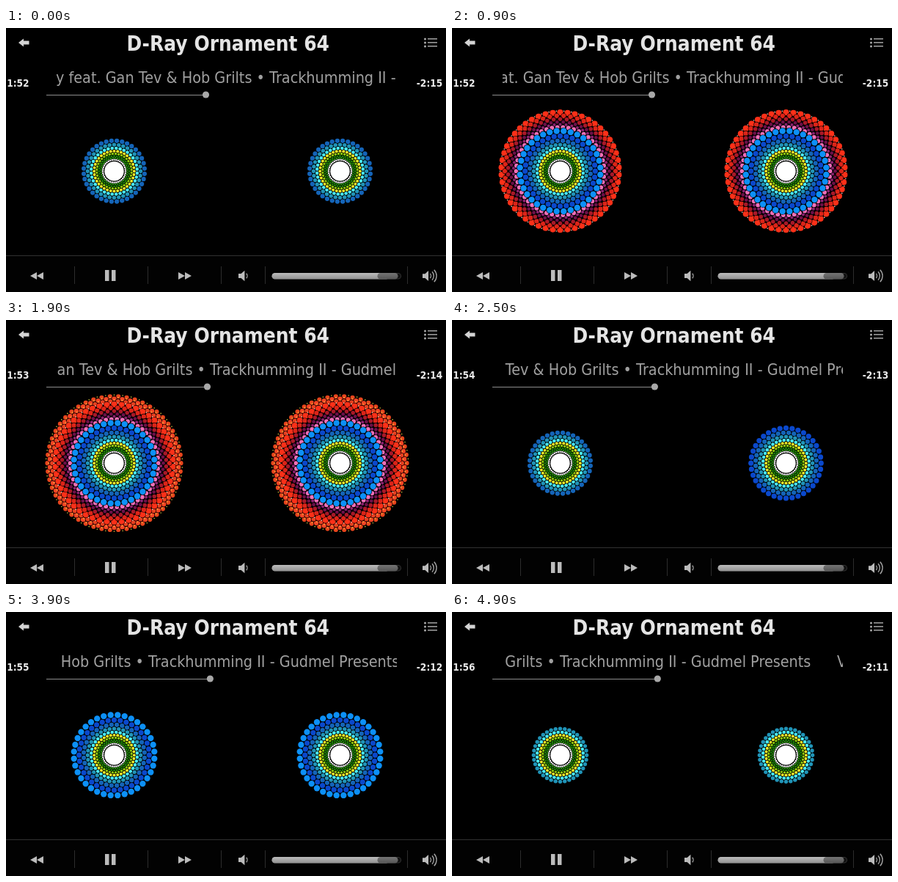
An HTML page with a canvas for the animation above (5 s loop, 600 by 360 pixels).

```html
<!DOCTYPE html>
<html>
<head>
<meta charset="utf-8">
<title>Music player</title>
<style>
html, body { margin: 0; height: 100%; overflow: hidden; background: #000; }
canvas { display: block; }
</style>
</head>
<body>
<canvas id="stage" width="600" height="360"></canvas>
<script>
const ctx = document.getElementById('stage').getContext('2d');
const TAU = Math.PI * 2;
const LOOP = 5000, STEP = 100;

// Inner rings grow by a fixed ratio, so their dots stay closely packed
const INNER = ['#fff', '#2c9c10', '#1c8408', '#8cc80c', '#ece82a',
  '#48e8f4', '#2094b8', '#1464b8', '#0a48cc', '#0c90f8'];
// Outer rings: [radius, dot radius, colour]
const OUTER = [
  [60, 2.9, '#f070b8'],
  [63.6, 2.1, '#8c2070'],
  [67, 2.4, '#6c1048'],
  [71, 2.8, '#a81828'],
  [75.3, 3.2, '#dc2418'],
  [80, 4.1, '#fc3018'],
  [84.4, 3, '#e84020'],
  [87.8, 3.2, '#f84424'],
  [91, 3.1, '#e8441c']
];
const RINGS = INNER.map((color, i) => {
  const r = 15.5 * 1.151 ** i;
  return [r, r * 0.076, color, 36];
}).concat(OUTER.map(ring => [...ring, 50]));

// Keyed values: [time, value, ...]
const SCROLL = [0, 359, 900, 320, 1900, 278, 2500, 251, 3300, 217, 3900, 194, 4900, 147];
const LEFT = [0, 45, 300, 70, 600, 52, 900, 85, 1200, 62, 1500, 77, 1900, 95, 2200, 70,
  2500, 45, 2900, 77, 3300, 45, 3500, 85, 3900, 59.5, 4200, 45, 4500, 85, 4900, 39];
const RIGHT = LEFT.map((v, i) => i % 2 && (LEFT[i - 1] === 2500 || LEFT[i - 1] === 3300) ? 52 : v);

function valueAt(keys, t) {
  let i = 0;
  while (i < keys.length - 4 && t > keys[i + 2]) i += 2;
  const [t0, a, t1, b] = keys.slice(i, i + 4);
  return a + (b - a) * (t - t0) / (t1 - t0);
}

function rect(x, y, w, h, color) {
  ctx.fillStyle = color;
  ctx.fillRect(x, y, w, h);
}

function poly(color, ...p) {
  ctx.beginPath();
  for (let i = 0; i < p.length; i += 2) ctx.lineTo(p[i], p[i + 1]);
  ctx.fillStyle = color;
  ctx.fill();
}

function dot(x, y, r, color) {
  ctx.beginPath();
  ctx.arc(x, y, r, 0, TAU);
  ctx.fillStyle = color;
  ctx.fill();
}

function pill(x, y, w, h, color) {
  ctx.beginPath();
  ctx.roundRect(x, y, w, h, h / 2);
  ctx.fillStyle = color;
  ctx.fill();
}

function shade(y0, y1, top, bottom) {
  const g = ctx.createLinearGradient(0, y0, 0, y1);
  g.addColorStop(0, top);
  g.addColorStop(1, bottom);
  return g;
}

// All text uses the condensed proportions of the face
function text(str, x, y, size, color, weight = 'normal', align = 'left') {
  ctx.save();
  ctx.translate(x, y);
  ctx.scale(0.9, 1);
  ctx.font = `${weight} ${size}px "DejaVu Sans", sans-serif`;
  ctx.textAlign = align;
  ctx.fillStyle = color;
  ctx.fillText(str, 0, 0);
  ctx.restore();
}

function clock(s) {
  return Math.floor(s / 60) + ':' + String(s % 60).padStart(2, '0');
}

function ringDots(cx, cy, radius, size, count, shift, color) {
  for (let i = 0; i < count; i++) {
    const a = (i + shift) * TAU / count;
    dot(cx + radius * Math.cos(a), cy + radius * Math.sin(a), size, color);
  }
}

function mandala(cx, level) {
  const cy = 195.2;
  const shown = RINGS.filter(([r, size]) => r + size <= level);
  for (let i = shown.length - 1; i >= 0; i--) {
    const [r, size, color, count] = shown[i], shift = i % 2 / 2;
    ringDots(cx, cy, r, size + 0.6, count, shift, '#000');
    ringDots(cx, cy, r, size, count, shift, color);
    if (r > 79) ringDots(cx, cy, r + 2, 0.8, count, shift + 0.5, r < 82 ? '#f4d8c8' : '#d8c840');
  }
  dot(cx, cy, 13.2, '#fff');
}

function speaker(x, y, k, waves) {
  poly('#bbb', x, y - 2.5 * k, x + 3 * k, y - 2.5 * k, x + 7 * k, y - 6 * k,
    x + 7 * k, y + 6 * k, x + 3 * k, y + 2.5 * k, x, y + 2.5 * k);
  ctx.strokeStyle = '#aaa';
  ctx.lineWidth = 1.3;
  for (let i = 0; i < waves; i++) {
    ctx.beginPath();
    ctx.arc(x + 6 * k, y, (4 + i * 3.3) * k, -0.75, 0.75);
    ctx.stroke();
  }
}

function header() {
  text('D-Ray Ornament 64', 302.7, 31, 27.8, '#e4e4e4', 'bold', 'center');
  poly('#d4d4d4', 17, 20, 24, 14.5, 24, 17.5, 31.5, 17.5, 31.5, 22.5, 24, 22.5, 24, 25.5);
  for (const y of [15, 20, 25]) {
    dot(571.5, y, 1.5, '#aaa');
    rect(575, y - 1, 13, 1.6, '#999');
  }
}

function controls() {
  rect(0, 310, 600, 1, '#303030');
  rect(0, 311, 600, 49, '#020202');
  for (const x of [93, 193, 293, 353, 547]) rect(x, 325, 1, 24, '#2c2c2c');
  for (const x of [33, 42]) poly('#bcbcbc', x, 338, x + 9, 333, x + 9, 343);
  for (const x of [235, 244]) poly('#bcbcbc', x, 333, x + 9, 338, x, 343);
  for (const x of [135, 144]) rect(x, 330, 5.5, 15, '#bcbcbc');
  speaker(317, 338, 1.2, 1);
  speaker(568, 338, 1.15, 3);
  pill(362.5, 334, 176.5, 8.5, '#333');
  pill(363.5, 335, 174.5, 6.5, '#111');
  pill(362.5, 334, 160, 8.5, shade(334, 342, '#bcbcbc', '#949494'));
  pill(506.5, 334, 28, 8.5, shade(334, 342, '#747474', '#585858'));
}

function ticker(x) {
  const color = '#a0a0a0', size = 21.4;
  ctx.save();
  ctx.beginPath();
  ctx.rect(69, 52, 464, 34);
  ctx.clip();
  text('Velty feat. Gan Tev & Hob Grilts • ', x, 75, size, color, 'normal', 'right');
  text('Trackhumming II - Gudmel Presents', x, 75, size, color);
  text('Velty feat.', x + 378, 75, size, color);
  ctx.restore();
}

function progress(sec) {
  const knob = 272.5 + sec * 1.95;
  text(clock(112 + sec), 1.2, 80, 13.6, '#e8e8e8', 'bold');
  text('-' + clock(135 - sec), 595.3, 80, 13.6, '#e8e8e8', 'bold', 'right');
  rect(55, 91, knob - 55, 1, '#8c8c8c');
  dot(knob, 91, 4.6, '#a8a8a8');
}

function draw() {
  const t = Math.floor(performance.now() % LOOP / STEP) * STEP;
  rect(0, 0, 600, 360, '#000');
  header();
  ticker(valueAt(SCROLL, t));
  progress(Math.floor(t / 1000));
  mandala(147.5, valueAt(LEFT, t));
  mandala(455.5, valueAt(RIGHT, t));
  controls();
  requestAnimationFrame(draw);
}
draw();
</script>
</body>
</html>
```
